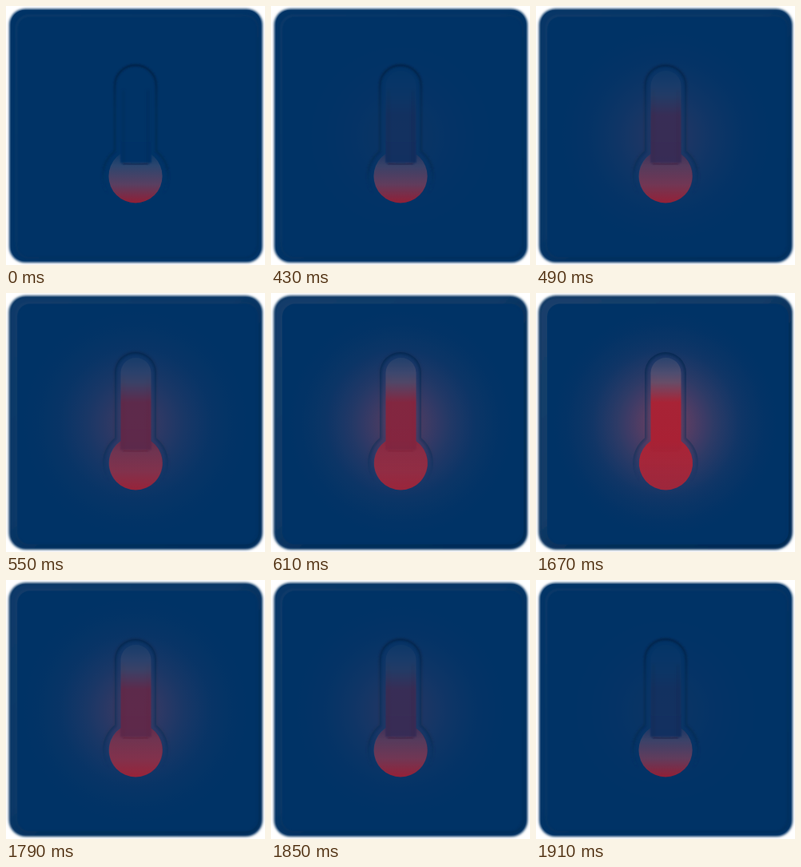
These frames come from a looping animation (324 by 324 pixels, 1.94 s). An HTML page:

```html
<!DOCTYPE html>
<html lang="en">
<head>
<meta charset="utf-8">
<title>Thermometer button</title>
<style>
  html, body { margin: 0; width: 100%; height: 100%; overflow: hidden; background: #fff; }
  svg { display: block; width: 100vw; height: 100vh; }
</style>
</head>
<body>
<svg viewBox="0 0 324 324">
  <defs>
    <filter id="soft1" x="-20%" y="-20%" width="140%" height="140%"><feGaussianBlur stdDeviation=".8"/></filter>
    <filter id="soft2" x="-20%" y="-20%" width="140%" height="140%"><feGaussianBlur stdDeviation="1.8"/></filter>

    <path id="groove" d="M136 100a26 26 0 0 1 52 0V181.3A41 41 0 1 1 136 181.3Z"/>
    <path id="fluid" d="M143.5 100a19 19 0 0 1 38 0V185.2A33.6 33.6 0 1 1 143.5 185.2Z"/>
    <clipPath id="inGroove"><use href="#groove"/></clipPath>

    <linearGradient id="bevel" x1="0" y1="0" x2="1" y2="1">
      <stop offset="0" stop-color="#1c426d"/>
      <stop offset=".45" stop-color="#143c67"/>
      <stop offset=".55" stop-color="#062f59"/>
      <stop offset="1" stop-color="#042b52"/>
    </linearGradient>
    <linearGradient id="rim" x1="0" y1="0" x2="0" y2="1">
      <stop offset="0" stop-color="#002349"/>
      <stop offset=".3" stop-color="#002951" stop-opacity=".7"/>
      <stop offset=".7" stop-color="#002951" stop-opacity=".65"/>
      <stop offset=".9" stop-color="#002f5e" stop-opacity="0"/>
    </linearGradient>
    <radialGradient id="glow" gradientUnits="userSpaceOnUse" cx="162" cy="163" r="145">
      <stop offset="0" stop-color="#b84a60" stop-opacity=".62"/>
      <stop offset=".2" stop-color="#b84a60" stop-opacity=".52"/>
      <stop offset=".42" stop-color="#b0506a" stop-opacity=".29"/>
      <stop offset=".65" stop-color="#a05070" stop-opacity=".11"/>
      <stop offset=".85" stop-color="#905878" stop-opacity=".03"/>
      <stop offset="1" stop-color="#905878" stop-opacity="0"/>
    </radialGradient>
    <linearGradient id="coldBulb" gradientUnits="userSpaceOnUse" x1="0" y1="179" x2="0" y2="247">
      <stop offset="0" stop-color="#003366"/>
      <stop offset=".3" stop-color="#2b466f"/>
      <stop offset=".65" stop-color="#593f61"/>
      <stop offset="1" stop-color="#911e35"/>
    </linearGradient>
    <linearGradient id="hotFluid" gradientUnits="userSpaceOnUse" x1="0" y1="80" x2="0" y2="247">
      <stop offset="0" stop-color="#2d456e"/>
      <stop offset=".12" stop-color="#575072"/>
      <stop offset=".19" stop-color="#735068"/>
      <stop offset=".26" stop-color="#953b50"/>
      <stop offset=".34" stop-color="#bb2231"/>
      <stop offset=".62" stop-color="#bd202f"/>
      <stop offset="1" stop-color="#9f283d"/>
    </linearGradient>
  </defs>

  <g id="cold">
    <rect width="324" height="324" fill="#fff"/>
    <rect x="4" y="3.5" width="317" height="317.5" rx="20" fill="#003366" filter="url(#soft2)"/>
    <rect x="6" y="5" width="313" height="314" rx="18" fill="#003366"/>
    <rect x="13" y="12" width="302" height="303" rx="16" fill="none" stroke="url(#bevel)" stroke-width="2.5" opacity=".45" filter="url(#soft1)"/>
    <use href="#groove" fill="none" stroke="url(#rim)" stroke-width="3" filter="url(#soft1)"/>
    <circle cx="162" cy="212.8" r="33.6" fill="url(#coldBulb)"/>
    <path d="M143 170H182V196H143Z" fill="#003366" filter="url(#soft1)"/>
    <path d="M147 105V197M177.5 105V197" stroke="#002a55" stroke-width="2" opacity=".55" filter="url(#soft2)"/>
    <path d="M146 197Q162 199 178 197" fill="none" stroke="#102b55" stroke-width="2.5" filter="url(#soft1)"/>
  </g>

  <g id="hot" opacity="0">
    <rect width="324" height="324" fill="#fff"/>
    <rect x="3" y="3" width="318" height="318" rx="22" fill="#0a3660" filter="url(#soft2)"/>
    <rect x="6" y="6" width="313" height="313" rx="20" fill="url(#bevel)" filter="url(#soft1)"/>
    <rect x="14" y="13.5" width="302" height="301" rx="16" fill="#003366"/>
    <circle cx="162" cy="163" r="145" fill="url(#glow)"/>
    <g clip-path="url(#inGroove)">
      <use href="#groove" fill="none" stroke="url(#rim)" stroke-width="6" opacity=".6" filter="url(#soft2)"/>
    </g>
    <use href="#fluid" fill="url(#hotFluid)"/>
  </g>
</svg>
<script>
  const loop = 1940;
  const at = (ms, opacity, easing = 'linear') => ({ offset: ms / loop, opacity, easing });

  // Each fade advances by a tenth every 30 ms.
  document.getElementById('hot').animate([
    at(0, 0),
    at(430, 0, 'steps(10, start)'),
    at(730, 1),
    at(1670, 1, 'steps(9, start)'),
    at(loop, 0.1)
  ], { duration: loop, iterations: Infinity });
</script>
</body>
</html>
```
